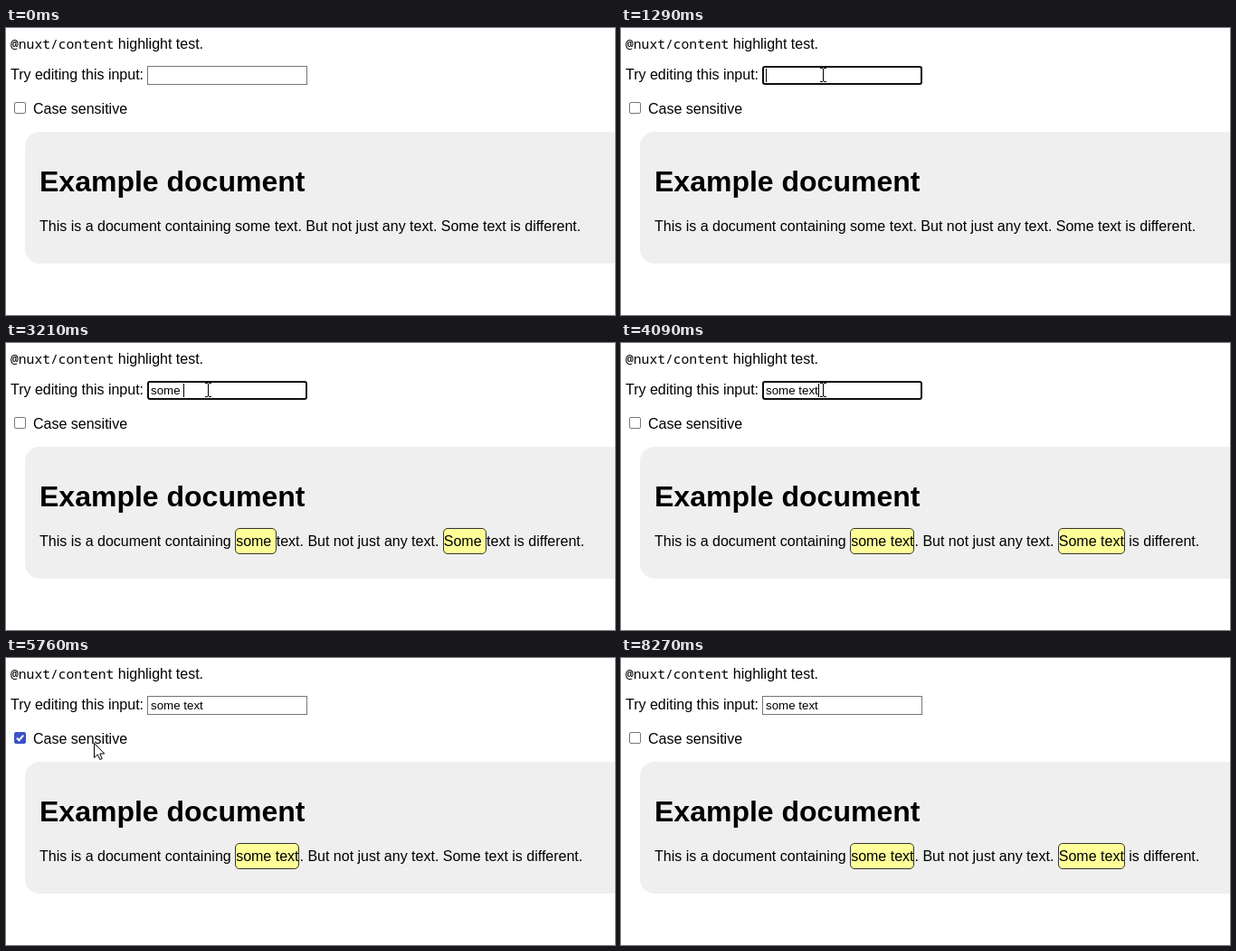
An HTML page for the animation above (8.43 s loop, 673x318 px).

```html
<!DOCTYPE html>
<html lang="en">
<head>
<meta charset="utf-8">
<title>Highlight test</title>
<style>
  html, body { margin: 0; width: 100%; height: 100%; overflow: hidden; background: #fff; }
  body { position: relative; color: #000; font: 16px/18px "Liberation Sans", Arial, sans-serif; white-space: nowrap; }
  .row, #field, #box, .card, .cursor { position: absolute; box-sizing: border-box; }
  .row { left: 5px; }
  code { font: 14.66px/18px "Noto Sans Mono", monospace; }
  #field {
    left: 156px; top: 42px; width: 177px; height: 21px; padding: 2px 3px;
    border: 1px solid #767676; font-size: 13.333px; line-height: 15px; white-space: pre;
  }
  #field.focus { padding: 1px 2px; border: 2px solid #101010; border-radius: 3px; }
  #caret { display: inline-block; width: 1px; height: 15px; background: #000; vertical-align: top; }
  #box { left: 9px; top: 82px; width: 13px; height: 13px; border: 1px solid #767676; border-radius: 2px; }
  #box svg { display: none; position: absolute; left: -1px; top: -1px; }
  #box.on { background: #3b53c6; border-color: #3b53c6; }
  #box.on svg { display: block; }
  .card { left: 21px; top: 115px; width: 700px; height: 146px; padding: 16px; border-radius: 16px; background: #efefef; }
  h1 { margin: 21.44px 0; font-size: 32px; line-height: 37px; }
  p { margin: 0; }
  mark { padding: 5px 0; border: 1px solid #333; border-radius: 5px; background: #ffff99; color: inherit; }
  .cursor { left: 0; top: 0; overflow: visible; }
</style>
</head>
<body>
<div class="row" style="top:8px"><code>@nuxt/content</code> highlight test.</div>
<div class="row" style="top:43px">Try editing this input:</div>
<div id="field"><span id="typed"></span><span id="caret"></span></div>
<div id="box"><svg width="13" height="13"><path d="M3 6.6 5.4 9.2 10.2 3.6" fill="none" stroke="#fff" stroke-width="2"/></svg></div>
<div class="row" style="left:30px;top:81px">Case sensitive</div>
<div class="card">
  <h1>Example document</h1>
  <p id="text"></p>
</div>
<svg class="cursor" id="arrow" width="13" height="20"><path d="M.5 .5V16.5L4.3 12.9 6.8 18.5 9.2 17.5 6.8 12H11.8Z" fill="#fff" stroke="#000"/></svg>
<svg class="cursor" id="beam" width="7" height="16"><path d="M0 .5H3M4 .5H7M3.5 1V15M0 15.5H3M4 15.5H7" fill="none" stroke="#000"/></svg>
<script>
const LOOP = 8430, STEP = 148.5, FIRST = 102;
const FOCUS = 1000, CHECK = 5450, UNCHECK = 7090;
const QUERY = "some text";
const KEYS = [1890, 2040, 2490, 2640, 2930, 3220, 3370, 3510, 3650];
const SENTENCE = "This is a document containing some text. But not just any text. Some text is different.";

// Pointer moves: start, end, from, to
const MOVES = [
  [400, 850, [262, 234], [223, 52]],
  [4840, 5300, [223, 52], [97, 94]],
  [7230, 7840, [97, 94], [150, 322]]
];

const $ = id => document.getElementById(id);
const [field, typed, caret, box, text, arrow, beam] =
  ["field", "typed", "caret", "box", "text", "arrow", "beam"].map($);

const ease = u => u * u * (3 - 2 * u);

function pointer(t) {
  const move = MOVES.filter(m => t >= m[0]).pop();
  if (!move) return null;
  const [start, end, from, to] = move;
  const u = ease(Math.min(1, (t - start) / (end - start)));
  return from.map((v, i) => Math.round(v + (to[i] - v) * u));
}

function highlight(query, exact) {
  return query ? SENTENCE.replace(new RegExp(query, exact ? "g" : "gi"), "<mark>$&</mark>") : SENTENCE;
}

function place(el, show, x, y) {
  el.style.display = show ? "block" : "none";
  if (show) el.style.transform = `translate(${x}px, ${y}px)`;
}

let shown = "";
function draw(t) {
  const count = KEYS.filter(k => t >= k).length;
  const query = QUERY.slice(0, count);
  const focus = t >= FOCUS && t < CHECK;
  const checked = t >= CHECK && t < UNCHECK;
  const html = highlight(query, checked);
  if (html !== shown) text.innerHTML = shown = html;

  typed.textContent = query;
  field.className = focus ? "focus" : "";
  box.className = checked ? "on" : "";
  const since = t - (count ? KEYS[count - 1] : FOCUS);
  caret.style.visibility = focus && since % 1000 < 500 ? "visible" : "hidden";

  const stepped = t < FIRST ? 0 : FIRST + Math.floor((t - FIRST) / STEP) * STEP;
  const at = pointer(stepped);
  const [x, y] = at || [0, 0];
  const inField = x >= 156 && x < 333 && y >= 42 && y < 63;
  place(arrow, at && !inField, x, y);
  place(beam, at && inField, x - 3, y - 8);
}

function tick() {
  draw(performance.now() % LOOP);
  requestAnimationFrame(tick);
}
tick();
</script>
</body>
</html>
```
